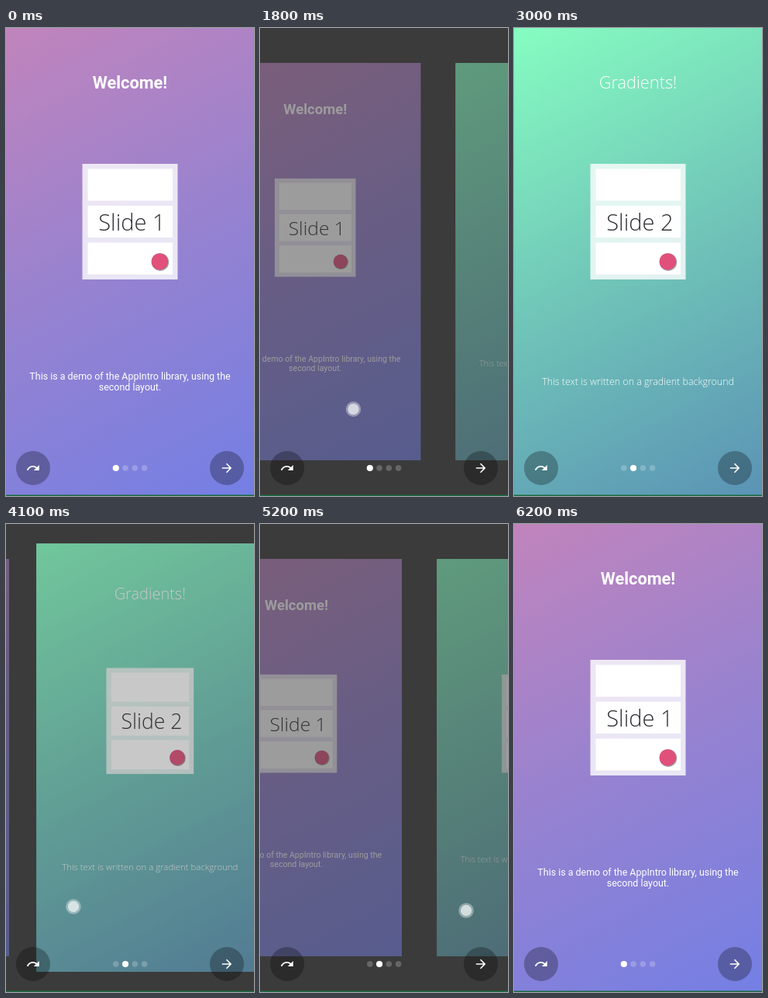
Write an HTML page with a canvas that moves like this. It is 320 px wide and 603 px high and loops after 6500 ms.

```html
<!DOCTYPE html>
<html lang="en">
<head>
<meta charset="utf-8">
<title>Intro slides</title>
<style>
  html, body { margin: 0; width: 100%; height: 100%; overflow: hidden; background: #3b3b3b; }
  canvas { display: block; width: 320px; height: 603px; }
</style>
</head>
<body>
<canvas id="stage"></canvas>
<script>
const W = 320, H = 603, PAGE_H = 602;
const LOOP = 6500, STEP = 100;
const BACK = '#3b3b3b';
const canvas = document.getElementById('stage');
const ctx = canvas.getContext('2d');
const ratio = window.devicePixelRatio || 1;
canvas.width = Math.round(W * ratio);
canvas.height = Math.round(H * ratio);

const ROBOTO = 'Roboto, sans-serif';
const LIGHT = '"Open Sans", sans-serif';

const slides = [
  {
    colors: ['#c184bc', '#9682d0', '#747fe4'],
    title: 'Welcome!', titleFont: `700 21.78px ${ROBOTO}`,
    lines: ['This is a demo of the AppIntro library, using the', 'second layout.'],
    lineFont: `400 12.44px ${ROBOTO}`, lineY: 452.5, label: 'Slide 1'
  },
  {
    colors: ['#86fdc1', '#70c5b8', '#5b93b5'],
    title: 'Gradients!', titleFont: `300 21.78px ${LIGHT}`,
    lines: ['This text is written on a gradient background'],
    lineFont: `300 12.44px ${LIGHT}`, lineY: 459.5, label: 'Slide 2'
  }
];

// Finger x and y over time; the page follows once the touch slop is passed.
const drags = [
  { path: [[1200, 218, 492], [1300, 208, 492], [1400, 190.5, 492], [2300, 33, 490], [2400, 14, 490]],
    grip: 210.7, from: 0, settle: 550 },
  { path: [[3600, 53, 493], [3800, 56, 493], [4000, 71, 493], [4100, 87, 493], [5200, 266, 498]],
    grip: 60.4, from: 1, settle: 500 }
];

const skipIcon = new Path2D('M18.4 10.6C16.55 8.99 14.15 8 11.5 8c-4.65 0-8.58 3.03-9.96 7.22L3.9 16c1.05-3.19 4.05-5.5 7.6-5.5 1.95 0 3.73.72 5.12 1.88L13 16h9V7z');
const nextIcon = new Path2D('M12 4l-1.41 1.41L16.17 11H4v2h12.17l-5.58 5.59L12 20l8-8z');

function circle(x, y, r, fill) {
  ctx.fillStyle = fill;
  ctx.beginPath();
  ctx.arc(x, y, r, 0, Math.PI * 2);
  ctx.fill();
}

function text(str, x, y, font, fill, align = 'center') {
  ctx.font = font;
  ctx.fillStyle = fill;
  ctx.textAlign = align;
  ctx.fillText(str, x, y);
}

function along(path, t) {
  let i = 1;
  while (i < path.length - 1 && t > path[i][0]) i++;
  const [t0, x0, y0] = path[i - 1], [t1, x1, y1] = path[i];
  const k = Math.min(1, Math.max(0, (t - t0) / (t1 - t0)));
  return { x: x0 + (x1 - x0) * k, y: y0 + (y1 - y0) * k };
}

function pagerState(t) {
  let scroll = 0, page = 0, finger = null;
  for (const { path, grip, from, settle } of drags) {
    const end = path[path.length - 1][0];
    if (t < path[0][0]) break;
    const dir = from ? -1 : 1;
    const point = along(path, t);
    scroll = from + dir * Math.max(0, dir * (grip - point.x)) / W;
    page = from;
    if (t <= end) {
      finger = point;
    } else {
      const left = Math.max(0, 1 - (t - end) / settle) ** 5;
      page = 1 - from;
      scroll = page + (scroll - page) * left;
    }
  }
  return { scroll, page, finger };
}

function drawCard(label) {
  ctx.fillStyle = 'rgba(255,255,255,.8)';
  ctx.fillRect(98.5, 175, 123, 149);
  ctx.fillStyle = '#fff';
  for (const y of [181.5, 229, 276.5]) ctx.fillRect(105.5, y, 109.5, 41);
  text(label, 119.3, 260.5, `300 29px ${LIGHT}`, '#2e2e33', 'left');
  circle(199, 301.7, 11.2, 'rgba(60,60,70,.5)');
  circle(198.3, 300.9, 10.7, '#e0507a');
}

// Zoom-out paging: shrink to 85 % and fade to half while moving.
function drawSlide(slide, pos) {
  if (Math.abs(pos) >= 1) return;
  const scale = Math.max(0.85, 1 - Math.abs(pos));
  const alpha = 0.5 + (scale - 0.85) / 0.15 * 0.5;
  const shift = (W / 2 - PAGE_H / 4) * (1 - scale);
  ctx.save();
  ctx.translate(W / 2 + W * pos - Math.sign(pos) * shift, PAGE_H / 2);
  ctx.scale(scale, scale);
  ctx.translate(-W / 2, -PAGE_H / 2);

  const fill = ctx.createLinearGradient(0, 0, W, PAGE_H);
  slide.colors.forEach((c, i) => fill.addColorStop(i / 2, c));
  ctx.fillStyle = fill;
  ctx.fillRect(0, 0, W, PAGE_H);
  text(slide.title, W / 2, 78, slide.titleFont, '#fff');
  slide.lines.forEach((line, i) =>
    text(line, W / 2, slide.lineY + i * 14.6, slide.lineFont, '#fff'));
  drawCard(slide.label);

  if (alpha < 1) {
    ctx.globalAlpha = 1 - alpha;
    ctx.fillStyle = BACK;
    ctx.fillRect(0, 0, W, PAGE_H);
  }
  ctx.restore();
}

function drawButton(x, icon) {
  circle(x, 567, 22, 'rgba(0,0,0,.28)');
  ctx.save();
  ctx.translate(x, 567);
  ctx.scale(0.778, 0.778);
  ctx.translate(-12, -12);
  ctx.fillStyle = '#fff';
  ctx.fill(icon);
  ctx.restore();
}

function draw(t) {
  const { scroll, page, finger } = pagerState(t);
  ctx.setTransform(ratio, 0, 0, ratio, 0, 0);
  ctx.fillStyle = BACK;
  ctx.fillRect(0, 0, W, H);
  slides.forEach((slide, i) => drawSlide(slide, i - scroll));

  drawButton(35, skipIcon);
  drawButton(285, nextIcon);
  for (let i = 0; i < 4; i++) {
    const on = i === page;
    circle(141.8 + i * 12.25, 567, on ? 4.1 : 3.8, on ? '#fff' : 'rgba(255,255,255,.22)');
  }
  if (finger) {
    circle(finger.x, finger.y, 9.8, 'rgba(255,255,255,.36)');
    circle(finger.x, finger.y, 7.2, 'rgba(255,255,255,.62)');
  }
  ctx.fillStyle = '#1b6b3f';
  ctx.fillRect(0, 601.5, W, 1.5);
}

function tick() {
  const t = performance.now() % LOOP;
  draw(Math.floor(t / STEP) * STEP);
  requestAnimationFrame(tick);
}
tick();
</script>
</body>
</html>
```
